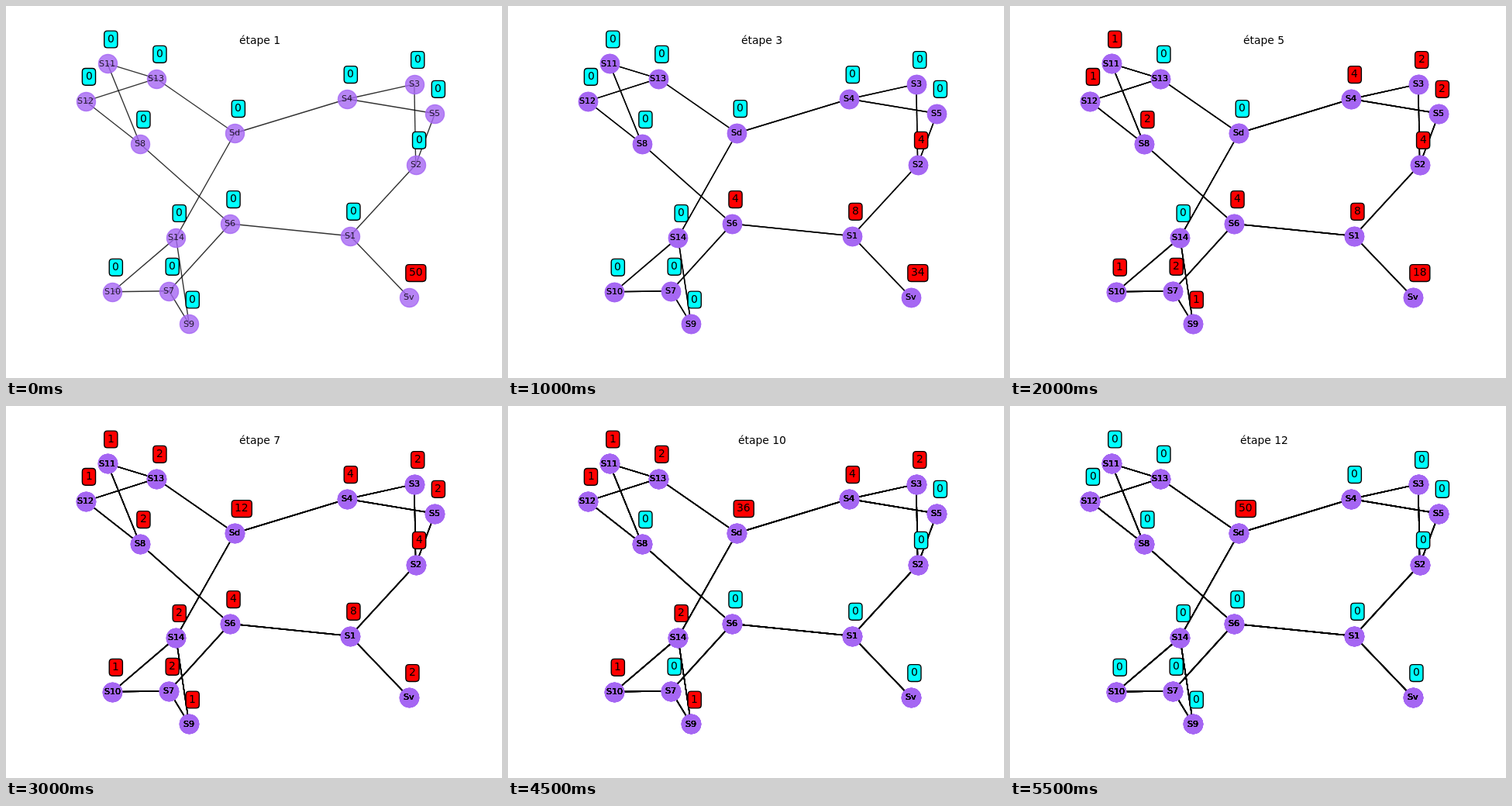
An HTML page with a canvas that plays this animation: 640 px wide and 480 px high, repeating every 6000 ms.

```html
<!DOCTYPE html>
<html lang="fr">
<head>
<meta charset="utf-8">
<title>Flot dans un réseau</title>
<style>
html, body { margin: 0; width: 100%; height: 100%; overflow: hidden; background: #fff; }
canvas { display: block; }
</style>
</head>
<body>
<canvas id="stage" width="640" height="480"></canvas>
<script>
const ctx = document.getElementById('stage').getContext('2d');
const STEP_MS = 500, STEPS = 12;
const PT = 100 / 72;
const FONT = '"DejaVu Sans", sans-serif';
const PURPLE = '#a566f2';
const LIFT = 27.6;

// x, y, amount held, first step, last full step, remainder one step later
const nodes = {
  Sv: [520, 376],
  S1: [444, 296.7, 8, 2, 7, 2],
  S2: [528.7, 204.7, 4, 3, 8, 2],
  S3: [526.8, 100.9, 2, 4, 10],
  S4: [440.4, 120, 4, 5, 10, 2],
  S5: [553.45, 138.7, 2, 4, 9],
  S6: [289.1, 281, 4, 3, 8],
  S7: [210.3, 367.7, 2, 4, 9],
  S8: [173, 178, 2, 4, 9],
  S9: [236.3, 410.4, 1, 5, 10],
  S10: [137.4, 368.7, 1, 5, 10],
  S11: [130.9, 74.4, 1, 5, 10],
  S12: [102.55, 122.8, 1, 5, 10],
  S13: [194, 93.7, 2, 6, 11],
  S14: [219.3, 298.9, 2, 6, 11],
  Sd: [295.4, 164]
};
const names = Object.keys(nodes);

const edges = ('Sv-S1 S1-S2 S1-S6 S2-S3 S2-S5 S3-S4 S5-S4 S4-Sd S6-S8 S6-S7 ' +
  'S8-S11 S8-S12 S11-S13 S12-S13 S13-Sd S7-S10 S7-S9 S10-S14 S9-S14 S14-Sd')
  .split(' ').map(e => e.split('-'));

function amount(name, step) {
  if (name === 'Sv') return Math.max(0, 50 - 8 * (step - 1));
  if (name === 'Sd') return Math.min(50, Math.max(0, 8 * (step - 5) - 4));
  const [, , held, first, last, rest = 0] = nodes[name];
  if (step < first || step > last + 1) return 0;
  return step <= last ? held : rest;
}

function setFont(pt) {
  ctx.font = `${pt * PT}px ${FONT}`;
}

// Text sits on whole pixels.
function write(text, x, y) {
  ctx.fillText(text, Math.round(x), Math.round(y));
}

function writeCentred(text, x, y) {
  write(text, x - ctx.measureText(text).width / 2, y);
}

function drawEdges() {
  ctx.strokeStyle = '#000';
  for (const [a, b] of edges) {
    ctx.beginPath();
    ctx.moveTo(nodes[a][0], nodes[a][1]);
    ctx.lineTo(nodes[b][0], nodes[b][1]);
    ctx.stroke();
  }
}

function drawDiscs() {
  ctx.fillStyle = ctx.strokeStyle = PURPLE;
  const r = Math.sqrt(300) / 2 * PT;
  for (const name of names) {
    const [x, y] = nodes[name];
    ctx.beginPath();
    ctx.arc(Math.round(x) + 0.5, Math.round(y) + 0.5, r, 0, 2 * Math.PI);
    ctx.fill();
    ctx.stroke();
  }
}

function drawLabels() {
  setFont(8);
  ctx.fillStyle = '#000';
  for (const name of names) {
    const [x, y] = nodes[name];
    writeCentred(name, x, y + 3.4);
  }
}

function roundBox(l, t, r, b, c) {
  ctx.beginPath();
  ctx.moveTo(l + c, t);
  ctx.lineTo(r - c, t);
  ctx.quadraticCurveTo(r, t, r, t + c);
  ctx.lineTo(r, b - c);
  ctx.quadraticCurveTo(r, b, r - c, b);
  ctx.lineTo(l + c, b);
  ctx.quadraticCurveTo(l, b, l, b - c);
  ctx.lineTo(l, t + c);
  ctx.quadraticCurveTo(l, t, l + c, t);
  ctx.closePath();
}

function drawBadge(name, step) {
  const [x, y] = nodes[name];
  const value = amount(name, step);
  const size = 10 * PT, pad = 0.3 * size, base = y - LIFT;
  const width = ctx.measureText(value).width;
  roundBox(x - pad, base - 0.76 * size - pad, x + width + pad, base + 0.21 * size + pad, pad);
  ctx.fillStyle = value ? '#f00' : '#0ff';
  ctx.fill();
  ctx.stroke();
  ctx.fillStyle = '#000';
  write(value, x, base);
}

// Translucent layers pile up with every step.
function draw(step) {
  ctx.globalAlpha = 1;
  ctx.fillStyle = '#fff';
  ctx.fillRect(0, 0, 640, 480);
  ctx.lineWidth = PT;
  ctx.globalAlpha = 0.8;
  for (const layer of [drawEdges, drawDiscs, drawLabels]) {
    for (let i = 0; i < step; i++) layer();
  }
  ctx.globalAlpha = 1;
  ctx.strokeStyle = '#000';
  setFont(10);
  for (const name of names) drawBadge(name, step);
  writeCentred(`étape ${step}`, 328, 49);
}

let shown = 0;
const start = performance.now();
function tick() {
  const elapsed = Math.max(0, performance.now() - start);
  const step = Math.floor(elapsed / STEP_MS) % STEPS + 1;
  if (step !== shown) draw(shown = step);
  requestAnimationFrame(tick);
}
tick();
</script>
</body>
</html>
```
